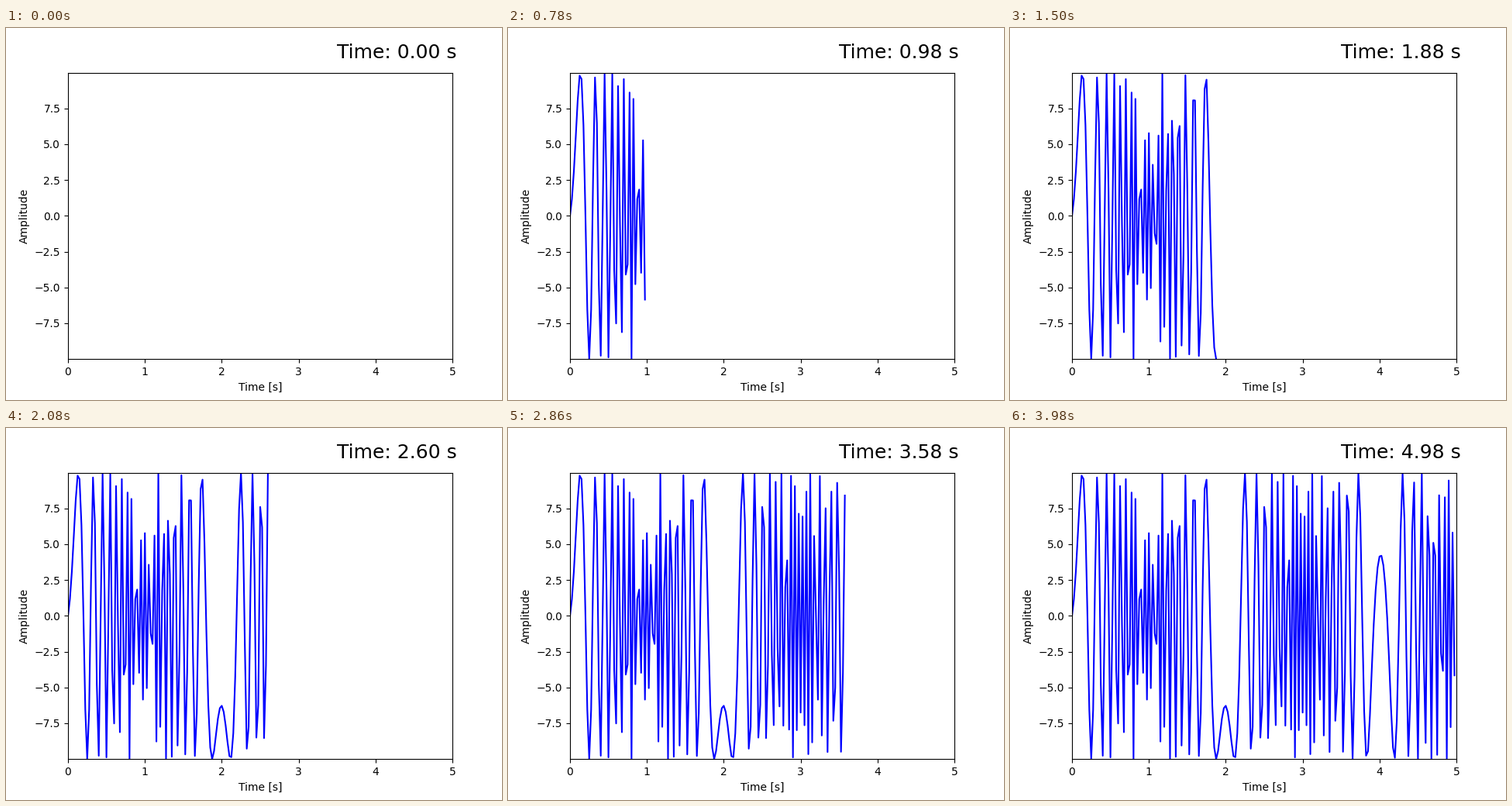
Recreate the animation shown at these times as a matplotlib script. Size 640 by 480 pixels, loop 4 s.

```python
import numpy as np
import matplotlib.pyplot as plt
from matplotlib.animation import FuncAnimation

FRAMES = 200
STEP = 0.025        # seconds of signal per frame
AMP = 10
F0 = 0.5            # start frequency, Hz
RATE = 9.902        # half the sweep rate, Hz/s

# A linear chirp whose coarse sampling folds the high frequencies back
t = np.arange(FRAMES) * STEP
y = AMP * np.sin(2 * np.pi * (F0 * t + RATE * t**2))

fig, ax = plt.subplots(figsize=(6.4, 4.8), dpi=100)
ax.set_xlim(0, 5)
ax.set_ylim(y.min(), y.max())
ax.set_xlabel("Time [s]")
ax.set_ylabel("Amplitude")

line, = ax.plot([], [], color="blue", lw=1.5)
clock = ax.text(0.7, 1.05, "", fontsize=18, transform=ax.transAxes)


def update(i):
    line.set_data(t[:i + 1], y[:i + 1])
    clock.set_text(f"Time: {t[i]:.2f} s")
    return line, clock


anim = FuncAnimation(fig, update, frames=FRAMES, interval=20,
                     repeat=True, repeat_delay=0)
plt.show()
```
